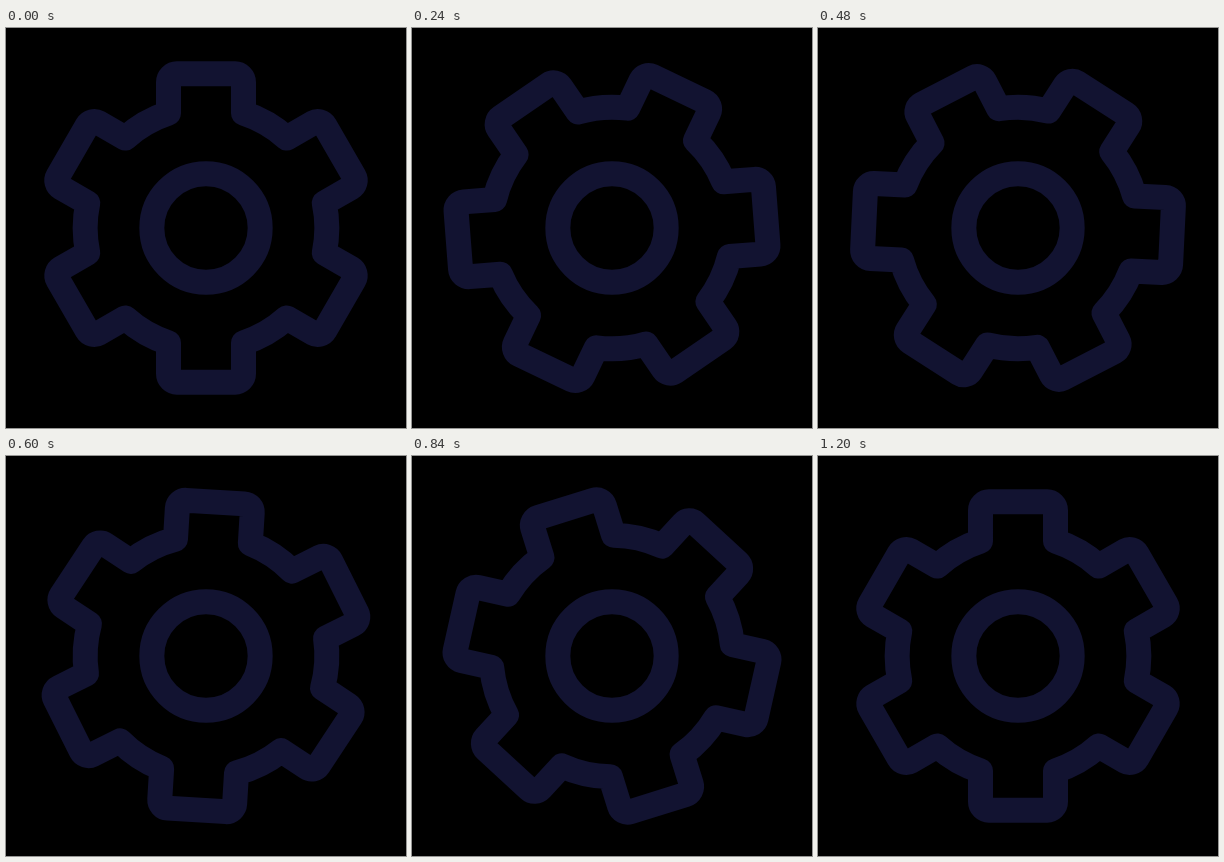
These frames come from a looping animation (400x400 px, 1.23 s). An HTML page with a canvas:

```html
<!DOCTYPE html>
<html lang="en">
<head>
<meta charset="utf-8">
<title>Turning gear</title>
<style>
  html, body { margin: 0; width: 100%; height: 100%; overflow: hidden; background: #000; }
  canvas { display: block; width: 400px; height: 400px; }
</style>
</head>
<body>
<canvas id="stage" width="400" height="400"></canvas>
<script>
const ctx = document.getElementById('stage').getContext('2d');

const SIZE = 400;
const UNIT = SIZE / 48;      // the icon sits on a 48-unit grid
const STEP = 30;             // ms per drawn pose
const LOOP = 1230;
const LAST_STEP = 40;
const TURN = Math.PI;
const TEETH = 6;
const BODY_RADIUS = 14.5;
const TOOTH_TOP = 18.5;
const TOOTH_HALF = 4.5;
const CORNER = 1;

// Cubic bezier easing (0.333, 0, 0.379, 1), solved by bisection.
function ease(x) {
  if (x <= 0 || x >= 1) return Math.min(Math.max(x, 0), 1);
  let lo = 0, hi = 1, s = 0.5;
  for (let i = 0; i < 30; i++) {
    s = (lo + hi) / 2;
    const r = 1 - s;
    const bx = 3 * s * r * r * 0.333 + 3 * s * s * r * 0.379 + s ** 3;
    if (bx < x) lo = s; else hi = s;
  }
  return s * s * (3 - 2 * s);
}

function gearPath() {
  const path = new Path2D();
  const pitch = 2 * Math.PI / TEETH;
  const half = Math.asin(TOOTH_HALF / BODY_RADIUS);
  const root = BODY_RADIUS * Math.cos(half);

  for (let i = 0; i < TEETH; i++) {
    const a = i * pitch;
    const cos = Math.cos(a), sin = Math.sin(a);
    const at = (x, y) => [x * cos - y * sin, x * sin + y * cos];
    const up = a - Math.PI / 2;

    if (i === 0) path.moveTo(...at(-TOOTH_HALF, -root));
    path.arcTo(...at(-TOOTH_HALF, -TOOTH_TOP), ...at(0, -TOOTH_TOP), CORNER);
    path.arcTo(...at(TOOTH_HALF, -TOOTH_TOP), ...at(TOOTH_HALF, -root), CORNER);
    path.lineTo(...at(TOOTH_HALF, -root));
    path.arc(0, 0, BODY_RADIUS, up + half, up + pitch - half);
  }
  path.closePath();
  return path;
}

const gear = gearPath();
const hub = new Path2D();
hub.arc(0, 0, 6.5, 0, 2 * Math.PI);

function draw(time) {
  const step = Math.floor((time % LOOP) / STEP);
  ctx.setTransform(1, 0, 0, 1, 0, 0);
  ctx.fillStyle = '#000';
  ctx.fillRect(0, 0, SIZE, SIZE);

  ctx.translate(SIZE / 2, SIZE / 2);
  ctx.scale(UNIT, UNIT);
  ctx.strokeStyle = '#121331';
  ctx.lineWidth = 3;
  ctx.lineJoin = 'round';
  ctx.stroke(hub);
  ctx.rotate(TURN * ease(step / LAST_STEP));
  ctx.stroke(gear);
}

let start;
function tick(now) {
  start ??= now;
  draw(Math.max(0, now - start));
  requestAnimationFrame(tick);
}
draw(0);
requestAnimationFrame(tick);
</script>
</body>
</html>
```
